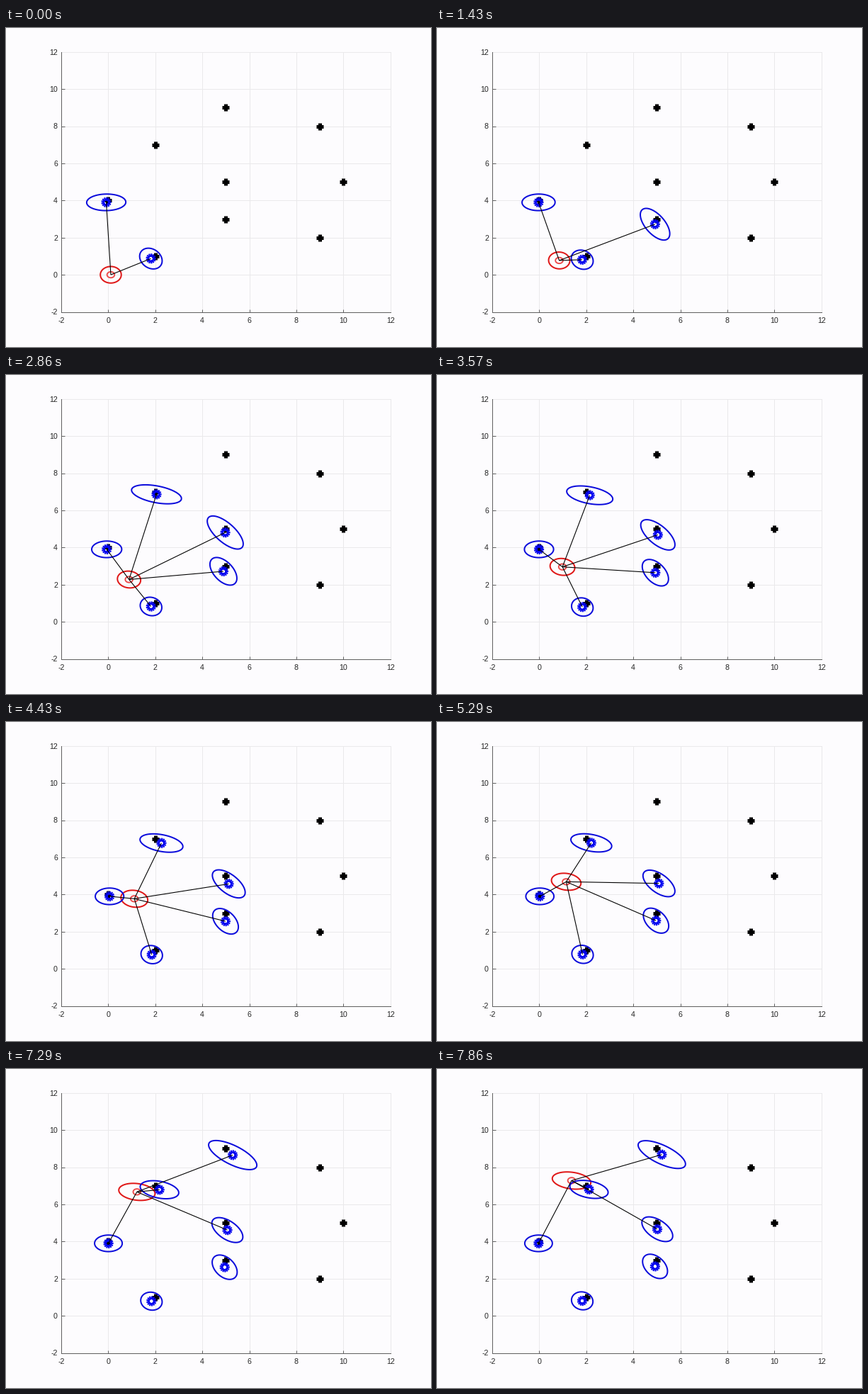
Recreate the animation shown at these times as a matplotlib script. Size 600x450 px, loop 8 s.

```python
import numpy as np
import matplotlib.pyplot as plt
from matplotlib.animation import FuncAnimation

W, H, DPI = 600, 450, 100
PX = 72 / DPI                          # points per pixel
LOOP, TICK, STEPS = 8000, 40, 56       # loop and redraw in ms, robot steps
LEFT, RIGHT, TOP, BOTTOM = 77.9, 542.8, 33.7, 400.5
LOW, HIGH = -2, 12
UNIT_X = (RIGHT - LEFT) / (HIGH - LOW)  # pixels per unit
UNIT_Y = (BOTTOM - TOP) / (HIGH - LOW)

BACK, INK, FRAME, GRID = "#fdfcfe", "#262626", "#606060", "#eae9eb"
BLUE, GEAR_BLUE, RED, SOFT_RED = "#0c0cdc", "#0505f0", "#e01818", "#ee4a4a"

LANDMARKS = np.array([(0, 4), (2, 1), (5, 3), (5, 5), (2, 7), (5, 9),
                      (9, 8), (10, 5), (9, 2)], float)

SENSOR_RANGE = 5
BASE_VAR = 0.445 ** 2      # position uncertainty shared by everything
HEADING_VAR = 0.0944 ** 2  # grows with distance from the origin
BEARING_VAR = 0.022        # extra at first sighting, across the line of sight
SETTLE = 12                # steps over which that extra fades
MAP_SHIFT = np.array([-0.22, -0.10])

# The map is turned a little about the origin: step, angle
TURN = [(0, 0.034), (10, 0.048), (20, 0.039), (31, 0.069),
        (43, 0.055), (51, 0.057), (55, 0.048)]

# Robot after its opening quarter turn: step, x, y
CLIMB = [(10, 0.85, 0.77), (20, 0.885, 2.275), (31, 1.11, 3.77),
         (43, 1.185, 5.6), (51, 1.22, 6.67), (55, 1.375, 7.28)]


def between(keys, k):
    t, *cols = np.array(keys).T
    return np.array([np.interp(k, t, c) for c in cols])


def robot_at(k):
    if k < 10:
        a = np.pi / 2 * k / 10
        return np.array([0.11 + 0.74 * np.sin(a), 0.77 * (1 - np.cos(a))])
    return between(CLIMB, k)


def in_range(i, k):
    return np.hypot(*(LANDMARKS[i] - robot_at(k))) < SENSOR_RANGE


def first_seen(i):
    return next((k for k in range(STEPS) if in_range(i, k)), None)


def estimate(i, age, k):
    x, y = LANDMARKS[i]
    turn = between(TURN, k)[0]
    fresh = 0.02 * np.exp(-age / 6)
    return MAP_SHIFT + (x + turn * y, y - (turn - fresh) * x)


def across(d):
    """Spread perpendicular to the vector d, growing with its length."""
    n = np.array([-d[1], d[0]])
    return np.outer(n, n)


def covariance(p):
    return BASE_VAR * np.eye(2) + HEADING_VAR * across(p)


ANGLE = np.linspace(0, 2 * np.pi, 121)


def ellipse(centre, cov):
    sx, sy = np.sqrt(np.diag(cov))
    phase = np.arccos(cov[0, 1] / (sx * sy))
    return (centre[0] + sx * np.cos(ANGLE),
            centre[1] + sy * np.cos(ANGLE - phase))


def gear_outline(teeth=13, inner=2.4, outer=7.1):
    a = 2 * np.pi * np.arange(teeth) / teeth
    r = np.array([inner, outer, np.nan])
    return (np.outer(np.cos(a), r).ravel() / UNIT_X,
            np.outer(np.sin(a), r).ravel() / UNIT_Y)


fig = plt.figure(figsize=(W / DPI, H / DPI), dpi=DPI, facecolor=BACK)
ax = fig.add_axes([LEFT / W, 1 - BOTTOM / H,
                   (RIGHT - LEFT) / W, (BOTTOM - TOP) / H], facecolor=BACK)
ticks = range(LOW, HIGH + 1, 2)
ax.set(xlim=(LOW, HIGH), ylim=(LOW, HIGH), xticks=ticks, yticks=ticks)
ax.set_xticklabels([str(t) for t in ticks])
ax.set_yticklabels([str(t) for t in ticks])
ax.grid(color=GRID, lw=PX)
ax.set_axisbelow(True)
ax.tick_params(direction="in", length=4.5 * PX, width=PX, color=FRAME,
               labelcolor=INK, labelsize=10.6 * PX,
               labelfontfamily="Liberation Sans")
ax.tick_params(axis="x", pad=7 * PX)
ax.tick_params(axis="y", pad=5 * PX)
for side, spine in ax.spines.items():
    dark = side in ("left", "bottom")
    spine.set(linewidth=PX, color=FRAME if dark else GRID,
              zorder=2.5 if dark else 1)
ax.plot(*LANDMARKS.T, ls="", marker="+", color="black",
        ms=10.5 * PX, mew=5 * PX, snap=False)


def pen(color, width, z):
    return ax.plot([], [], color=color, lw=width * PX, zorder=z,
                   solid_capstyle="butt")[0]


GEAR_X, GEAR_Y = gear_outline()
SEEN = {i: k for i in range(len(LANDMARKS))
        if (k := first_seen(i)) is not None}
robot_ring = pen(RED, 2, 3)
robot_body = pen(SOFT_RED, 1.9, 3)
rings = {i: pen(BLUE, 2, 4) for i in SEEN}
gears = {i: pen(GEAR_BLUE, 2.2, 5) for i in SEEN}
rays = {i: pen("black", 1.1, 6) for i in SEEN}


def draw(n):
    # the robot moves in whole steps; a redraw shows the step it contains
    k = int((n * TICK + TICK - 5) * STEPS / LOOP)
    robot = robot_at(k)
    robot_ring.set_data(*ellipse(robot, covariance(robot)))
    robot_body.set_data(*ellipse(robot, 0.16 ** 2 * np.eye(2)))
    for i, born in SEEN.items():
        age = max(k - born, 0)
        x, y = estimate(i, age, k)
        sight = LANDMARKS[i] - robot_at(born)
        cov = (covariance(LANDMARKS[i])
               + BEARING_VAR * np.exp(-age / SETTLE) * across(sight))
        rings[i].set_data(*ellipse((x, y), cov))
        gears[i].set_data(x + GEAR_X, y + GEAR_Y)
        rays[i].set_data([robot[0], x], [robot[1], y])
        rings[i].set_visible(k >= born)
        gears[i].set_visible(k >= born)
        rays[i].set_visible(k >= born and in_range(i, k))
    return [robot_ring, robot_body, *rings.values(),
            *gears.values(), *rays.values()]


anim = FuncAnimation(fig, draw, frames=LOOP // TICK, interval=TICK,
                     init_func=lambda: draw(0), repeat=True, repeat_delay=0)
plt.show()
```
